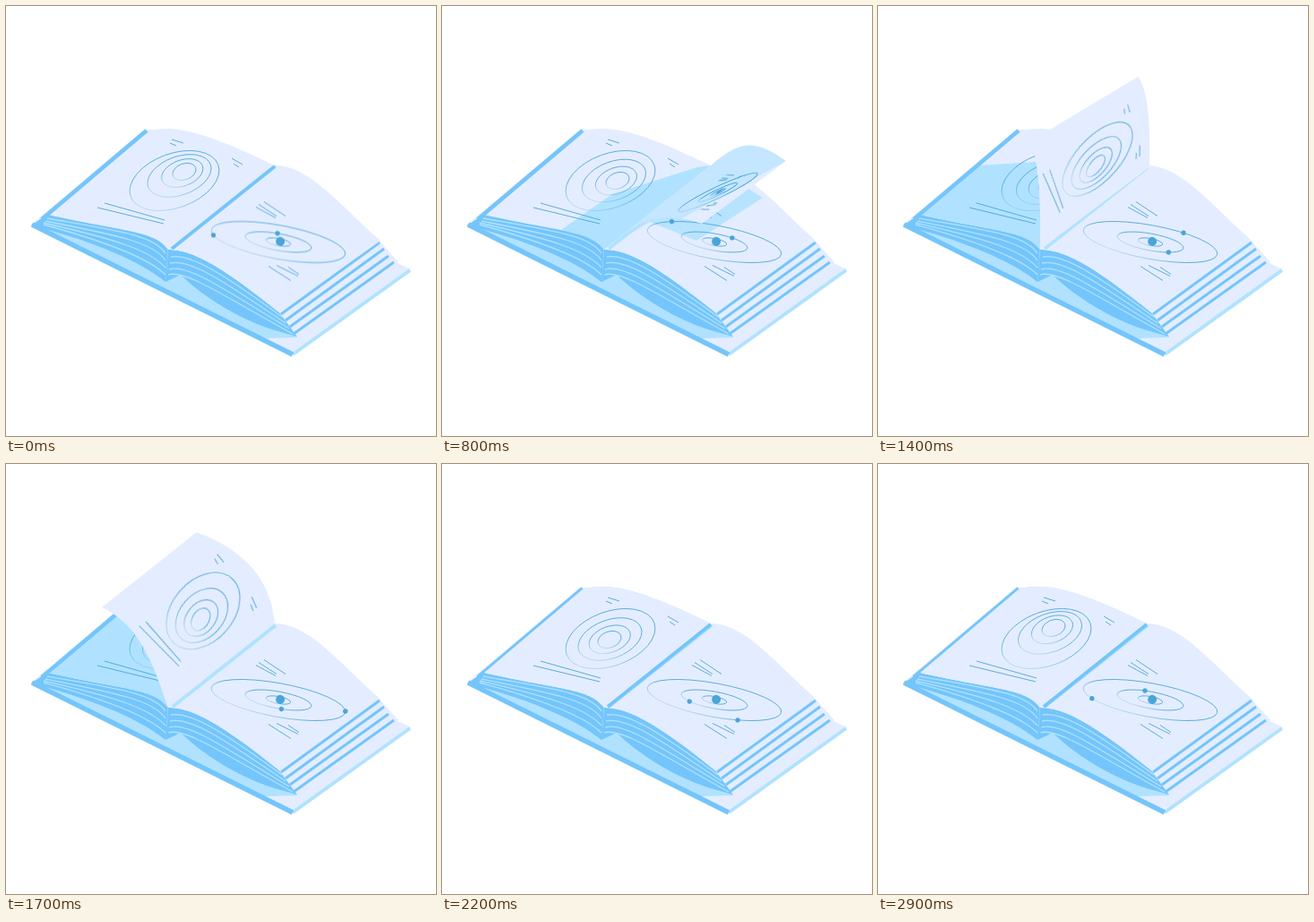
Recreate the animation shown at these times as an HTML page without scripts. Size 480 px wide and 480 px high, loop 3000 ms.

```html
<!DOCTYPE html>
<html lang="en">
<head>
<meta charset="utf-8">
<title>Turning page</title>
<style>
@property --outer { syntax: "<angle>"; inherits: true; initial-value: 0deg; }
@property --inner { syntax: "<angle>"; inherits: true; initial-value: 0deg; }
@property --x { syntax: "<length>"; inherits: true; initial-value: 0px; }
@property --y { syntax: "<length>"; inherits: true; initial-value: 0px; }

html, body { margin: 0; width: 100%; height: 100%; overflow: hidden; background: #fff; }
svg { display: block; width: 100vw; height: 100vh; }
.pale { fill: #e4edff; }
.light { fill: #b0e2ff; }
.blue { fill: #74c5fb; }
.line { fill: none; }
.ink { fill: none; stroke: #4aa5d9; stroke-width: .9; }
.ink * { vector-effect: non-scaling-stroke; }
.fade { stroke: url(#fade); }
.dot { fill: #4aa5d9; stroke: none; }

/* every motion advances ten times a second */
.anim { animation: 3s -5ms infinite; }
.page { animation-name: page; }
.shade { animation-name: shade; }
.castLeft { animation-name: castLeft; }
.castRight { animation-name: castRight; }
.front { animation-name: front, lift; animation-timing-function: ease, step-end; }
.back { animation-name: back, land; animation-timing-function: ease, step-end; }
.spine { animation-name: spine; animation-timing-function: step-end; }
.ripple { animation-name: ripple; }
.spinTurning { animation-name: spinTurning; }
.spinResting { animation-name: spinResting, reveal; animation-timing-function: ease, step-end; }

.outer { transform: translate(calc(cos(var(--outer)) * 76px), calc(sin(var(--outer)) * 18.8px)); }
.inner { transform: translate(calc(cos(var(--inner)) * 37.5px), calc(sin(var(--inner)) * 9.4px)); }
.r1 { transform: translate(var(--x), var(--y)); }
.r2 { transform: translate(calc(var(--x) * .8), calc(var(--y) * .85)); }
.r3 { transform: translate(calc(var(--x) * .5), calc(var(--y) * .55)); }

@keyframes page {
  0% { d: path("M181 272C207 272 238 288 305 342L418 262C372 222 338 178 300 178Z"); animation-timing-function: steps(4); }
  13.3333% { d: path("M181 272C265 232 225 238 300 297L399 222C352 174 332 155 300 178Z"); animation-timing-function: steps(4); }
  26.6667% { d: path("M181 272C215 245 235 225 290 243L384 173C350 150 335 148 300 178Z"); animation-timing-function: steps(2); }
  33.3333% { d: path("M181 272C205 245 225 225 262 212L366 138C345 135 315 155 300 178Z"); animation-timing-function: steps(2); }
  40% { d: path("M181 272C198 235 215 200 218 177L328 95C330 115 305 150 301 178Z"); animation-timing-function: steps(2); }
  46.6667% { d: path("M181 272C181 245 183 200 172 150L290 79C303 95 304 140 303 180Z"); animation-timing-function: steps(2); }
  53.3333% { d: path("M181 272C175 240 165 180 129 154L240 70C280 85 298 130 301 178Z"); animation-timing-function: steps(1); }
  56.6667% { d: path("M181 272C165 225 150 180 107 160L213 76C255 92 295 120 300 178Z"); animation-timing-function: steps(1); }
  60% { d: path("M181 272C165 235 140 190 78 176L185 88C235 95 285 135 300 178Z"); animation-timing-function: steps(2); }
  66.6667% { d: path("M181 272C165 250 130 225 52 215L161 118C210 112 270 150 300 178Z"); animation-timing-function: steps(2); }
  73.3333%, 100% { d: path("M181 272C165 250 130 252 47 233L158 139C188 133 218 138 300 178Z"); }
}
@keyframes shade {
  0% { d: path("M181 272L185 270L302 180L302 178L300 178Z"); opacity: .6; animation-timing-function: steps(4); }
  13.3333% { d: path("M181 272L246 258L354 182L325 150L300 178Z"); opacity: .6; animation-timing-function: steps(4); }
  26.6667% { d: path("M181 272L270 236L384 173L340 140L300 178Z"); opacity: .6; animation-timing-function: steps(2); }
  33.3333%, 100% { d: path("M181 272L262 212L366 138L345 135L300 178Z"); opacity: 0; }
}
@keyframes castLeft {
  0% { d: path("M181 272L181 272L240 225L300 178L300 178Z"); animation-timing-function: steps(4); }
  13.3333% { d: path("M181 272L172 268L232 214L288 174L300 178Z"); animation-timing-function: steps(4); }
  26.6667% { d: path("M181 272L130 252L190 210L285 180L300 178Z"); animation-timing-function: steps(6); }
  46.6667% { d: path("M181 272L30 250L112 178L175 174L300 178Z"); animation-timing-function: steps(3); }
  56.6667%, 100% { d: path("M181 272L30 250L158 136L200 130L300 178Z"); }
}
@keyframes castRight {
  0% { d: path("M181 272L230 285L305 342L418 262L300 178Z"); animation-timing-function: steps(4); }
  13.3333% { d: path("M181 272L236 261L300 311L396 242L300 178Z"); animation-timing-function: steps(4); }
  26.6667% { d: path("M181 272L232 241L284 262L358 214L300 178Z"); animation-timing-function: steps(2); }
  33.3333%, 100% { d: path("M181 272L200 257L240 225L300 180L300 178Z"); }
}
@keyframes front {
  0% { transform: matrix(1, 0, 0, 1, 304, 263.5); animation-timing-function: steps(4); }
  13.3333% { transform: matrix(.883, -.131, -.149, .833, 302, 234); animation-timing-function: steps(4); }
  26.6667% { transform: matrix(.654, -.347, -.441, .559, 308, 208); animation-timing-function: steps(2); }
  33.3333%, 100% { transform: matrix(.616, -.468, -.488, .405, 300, 190); }
}
@keyframes back {
  0%, 33.3333% { transform: matrix(-.016, .126, -1.292, 1.16, 280, 180); animation-timing-function: steps(4); }
  46.6667% { transform: matrix(.44, .27, -.76, 1.31, 245, 171); animation-timing-function: steps(3); }
  56.6667% { transform: matrix(.694, .279, -.389, 1.354, 220, 164); animation-timing-function: steps(5); }
  73.3333%, 100% { transform: matrix(1, 0, 0, 1, 188, 195); }
}
@keyframes lift { 0% { visibility: visible; } 33.3333%, 100% { visibility: hidden; } }
@keyframes land { 0% { visibility: hidden; } 33.3333%, 100% { visibility: visible; } }
@keyframes reveal { 0% { visibility: hidden; } 20%, 100% { visibility: visible; } }
@keyframes spine { 0% { visibility: visible; } 3.3333% { visibility: hidden; } 73.3333%, 100% { visibility: visible; } }
@keyframes ripple {
  0% { --x: 11px; --y: -10px; animation-timing-function: steps(4); }
  13.3333% { --x: 20px; --y: -4px; animation-timing-function: steps(4); }
  26.6667% { --x: 8px; --y: 0px; animation-timing-function: steps(6); }
  46.6667% { --x: 4px; --y: 5px; animation-timing-function: steps(3); }
  56.6667% { --x: 0px; --y: 7px; animation-timing-function: steps(5); }
  73.3333% { --x: -1px; --y: 1px; animation-timing-function: steps(7); }
  96.6667% { --x: 8px; --y: -12px; animation-timing-function: steps(1); }
  100% { --x: 11px; --y: -10px; }
}
@keyframes spinTurning {
  0% { --outer: 163deg; --inner: 266deg; animation-timing-function: steps(4); }
  13.3333% { --outer: 238deg; --inner: 322deg; animation-timing-function: steps(6); }
  33.3333%, 100% { --outer: 315deg; --inner: 400deg; }
}
@keyframes spinResting {
  0% { --outer: 163deg; --inner: 266deg; animation-timing-function: steps(8); }
  26.6667% { --outer: 228deg; --inner: 300deg; animation-timing-function: steps(6); }
  46.6667% { --outer: 297deg; --inner: 414deg; animation-timing-function: steps(3); }
  56.6667% { --outer: 356deg; --inner: 442deg; animation-timing-function: steps(5); }
  73.3333% { --outer: 427deg; --inner: 496deg; animation-timing-function: steps(7); }
  96.6667% { --outer: 508deg; --inner: 618deg; animation-timing-function: steps(1); }
  100% { --outer: 523deg; --inner: 626deg; }
}
</style>
</head>
<body>
<svg viewBox="0 0 480 480">
  <defs>
    <linearGradient id="fade" x1="0" y1=".85" x2=".5" y2=".35">
      <stop offset=".15" stop-color="#4aa5d9" stop-opacity=".3"/>
      <stop offset=".7" stop-color="#4aa5d9"/>
    </linearGradient>
    <path id="leftPage" d="M181 272C165 250 130 252 47 233L158 139C188 133 218 138 300 178Z"/>
    <path id="rightPage" d="M181 272C207 272 238 288 305 342L414 259C372 222 338 178 300 178Z"/>
    <clipPath id="leftClip"><use href="#leftPage"/></clipPath>
    <clipPath id="rightClip"><use href="#rightPage"/></clipPath>
    <clipPath id="turningClip"><path class="anim page" d=""/></clipPath>

    <g id="rings" class="ink">
      <ellipse class="fade" rx="52" ry="30.3" transform="rotate(-20)"/>
      <g class="r3"><ellipse class="fade" rx="37" ry="21.5" transform="rotate(-20)"/></g>
      <g class="r2"><ellipse class="fade" rx="24" ry="14.5" transform="rotate(-20)"/></g>
      <g class="r1"><ellipse class="fade" rx="13.5" ry="9" transform="rotate(-20)"/></g>
      <path d="M-3 -46L10 -42M-5 -42L2 -39M64 -25L76 -18M66 -19L72 -15M-78 25L-11 44M-86 30L-12 48"/>
    </g>
    <g id="orbits" class="ink">
      <g transform="rotate(10.4)">
        <ellipse class="fade" rx="76" ry="18.8"/>
        <ellipse class="fade" rx="37.5" ry="9.4"/>
        <ellipse class="fade" rx="14" ry="4"/>
        <circle class="dot" cx="2" cy="-1" r="5"/>
        <circle class="dot outer" r="2.7"/>
        <circle class="dot inner" r="2.7"/>
      </g>
      <path d="M-16 -45L8 -29M-22 -42L-2 -29M-25 -39L-3 -27M-11 27L14 43M-2 26L22 38M11 28L23 36"/>
    </g>
  </defs>

  <!-- cover -->
  <path class="pale" d="M28 244L154 138H165L433 285L452 294L319 389Z"/>
  <path class="light" d="M32 243L180 295L322 352L325 370L288 371L300 380Z"/>
  <path class="line" stroke="#b0e2ff" stroke-width="4" d="M320 389L451 295"/>
  <path class="line" stroke="#74c5fb" stroke-width="5.5" d="M29 244L320 389"/>

  <!-- page blocks -->
  <path class="blue" d="M28 245L47 232C130 250 165 250 181 270L178 308C150 285 100 264 34 246Z"/>
  <path class="line" stroke="#b0e2ff" stroke-width="1.3" d="M46 237C125 251 165 256 178 276M44 240C125 256 165 264 178 284M42 242C120 260 160 272 178 292M42 244C115 264 160 282 178 300"/>
  <path class="blue" d="M181 272C207 272 238 288 305 342L325 369L300 362C255 348 215 320 195 300L178 308Z"/>
  <path class="line" stroke="#b0e2ff" stroke-width="1.3" d="M184 280C205 276 240 297 308 347M183 287C205 282 240 305 312 354M182 294C203 288 240 314 316 360M181 300C200 294 240 322 320 366"/>
  <path class="pale" d="M305 342L414 259L438 286L325 369Z"/>
  <path class="line" stroke="#74c5fb" stroke-width="3" d="M307 344L417 264M312 351L422 271M317 358L427 279M321 366L433 286"/>

  <!-- resting pages -->
  <use href="#leftPage" class="pale"/>
  <use href="#rightPage" class="pale"/>
  <g clip-path="url(#leftClip)"><path class="light anim castLeft" d=""/></g>
  <g clip-path="url(#rightClip)"><path class="light anim castRight" d="" opacity=".85"/></g>
  <path class="line" stroke="#b0e2ff" stroke-width="4" d="M301 180L186 271"/>
  <path class="line" stroke="#74c5fb" stroke-width="4.5" d="M157 139L40 238"/>
  <g transform="translate(188 195)"><g class="anim ripple"><use href="#rings"/></g></g>
  <g transform="translate(304 263.5)"><g class="anim spinResting"><use href="#orbits"/></g></g>

  <!-- turning page -->
  <path class="pale anim page" d=""/>
  <g clip-path="url(#turningClip)"><path class="light anim shade" d=""/></g>
  <g class="anim front"><g class="anim spinTurning"><use href="#orbits"/></g></g>
  <g class="anim back"><g class="anim ripple"><use href="#rings"/></g></g>
  <path class="line anim spine" stroke="#74c5fb" stroke-width="4" d="M300 179L185 271"/>
</svg>
</body>
</html>
```
